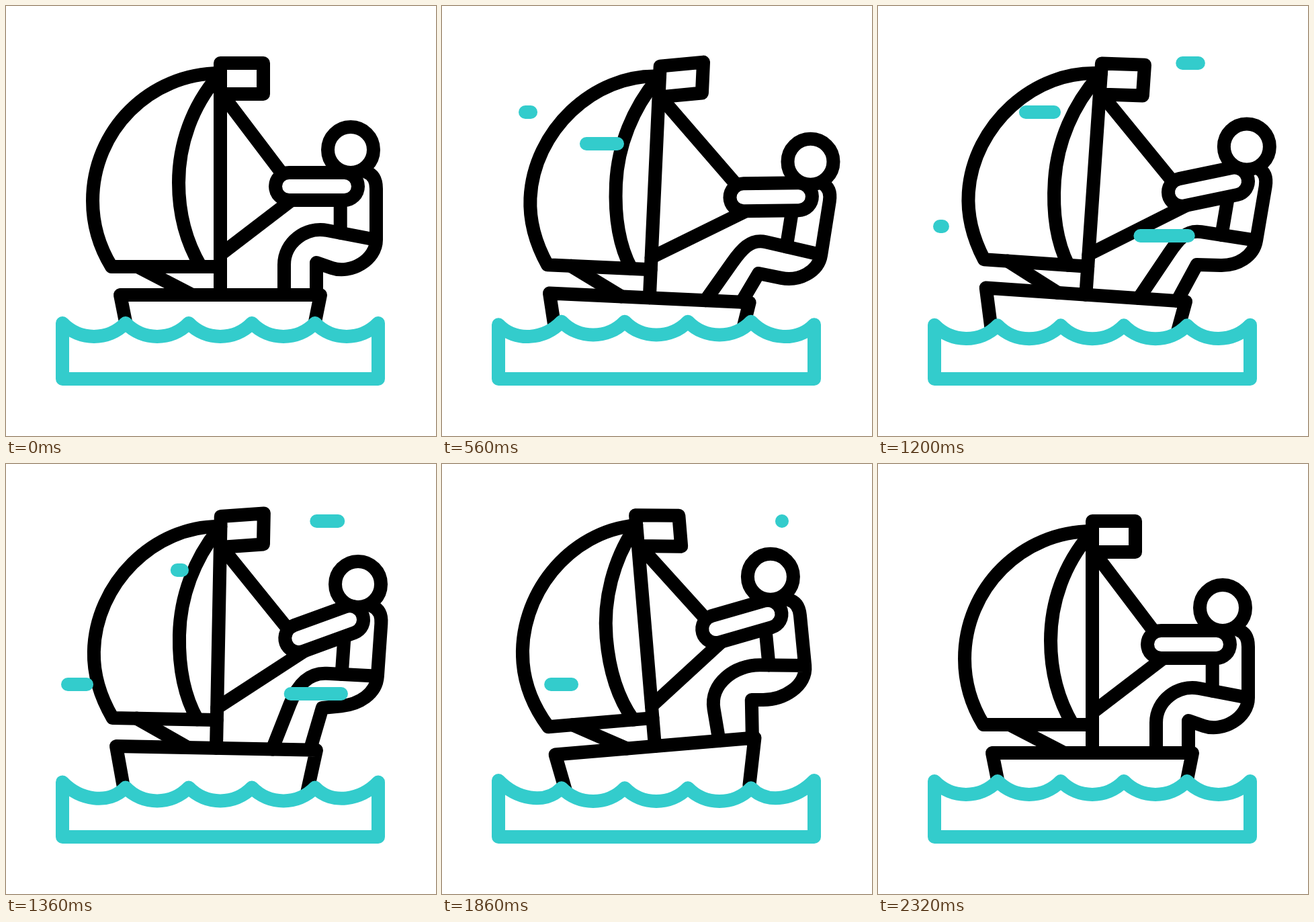
An HTML page with a canvas for the animation above (2.4 s loop, 640 by 640 pixels).

```html
<!DOCTYPE html>
<html lang="en">
<head>
<meta charset="utf-8">
<title>Sailing</title>
<style>
  html, body { margin: 0; width: 100%; height: 100%; overflow: hidden; background: #fff; }
  canvas { display: block; width: 100vw; height: 100vh; }
</style>
</head>
<body>
<canvas id="stage" width="640" height="640"></canvas>
<script>
const ctx = document.getElementById('stage').getContext('2d');
const LOOP = 2400, STEP = 20, START = 220, END = 2320;
const BLACK = '#000', CYAN = '#33cccc', WHITE = '#fff';

const ease = u => { u = Math.min(1, Math.max(0, u)); return u * u * (3 - 2 * u); };

// A value that rests at zero and eases through the given [time, value] stops.
function motion(...stops) {
  const keys = [[START, 0], ...stops, [END, 0]];
  return t => keys.slice(1).reduce((v, [end, to], i) => {
    const [begin, from] = keys[i];
    return v + (to - from) * ease((t - begin) / (end - begin));
  }, 0);
}

const leanAt = motion([840, 1], [900, 1], [1800, -.25]);
const riseAt = motion([900, 0], [1560, 1]);
const tiltAt = motion([960, 6], [1820, -4.9]);
const flagAt = motion([560, -9], [920, 4], [1400, -6], [1860, 6]);
const slackAt = t => t < START || t > END ? 0 :
  8 * Math.sin(3 * Math.PI * (t - START) / (END - START)) ** 2;

// Wind: start time, height, left end, right end.
const GUSTS = [
  [200, 205, 213, 305],
  [457, 158, 124, 262],
  [798, 342, 383, 512],
  [873, 85, 453, 506],
  [1117, 328, 92, 193]
];

const dist = (a, b) => Math.hypot(b[0] - a[0], b[1] - a[1]);
const unit = (a, b) => { const d = dist(a, b) || 1; return [(b[0] - a[0]) / d, (b[1] - a[1]) / d]; };
const go = (p, dir, n) => [p[0] + dir[0] * n, p[1] + dir[1] * n];
const mix = (a, b, f) => [a[0] + (b[0] - a[0]) * f, a[1] + (b[1] - a[1]) * f];
const turn = ([x, y], a) =>
  [x * Math.cos(a) - y * Math.sin(a), x * Math.sin(a) + y * Math.cos(a)];

function stroke(path, color = BLACK, width = 20) {
  ctx.strokeStyle = color;
  ctx.lineWidth = width;
  ctx.stroke(path);
}
function line(points, color, width) {
  const path = new Path2D();
  points.forEach(p => path.lineTo(...p));
  stroke(path, color, width);
}

function drawBoat(x, y, tilt, slack, flag) {
  ctx.save();
  ctx.translate(x, y);
  ctx.rotate(tilt);
  ctx.translate(-319, -430);
  line([[184, 500], [170, 430], [468, 430], [454, 500]]);
  line([[196 + slack / 2, 388], [277, 430]]);
  line([[319, 430], [319, 85], [383, 85 + flag], [383, 131 + flag], [319, 131]]);
  const m = slack * .75, n = slack * .55;
  stroke(new Path2D(`M319 100 C${214 + m} 100 ${129 + m} ${185 + m} ${129 + m} 290
    C${129 + m} 324.5 ${139 + slack} 358.6 ${157 + slack} 388 H319`));
  stroke(new Path2D(`M315 105 C${277.5 + n} 149 ${257 + n} 205 ${257 + n} 263
    C${257 + n} 307 267.5 350 290 388`));
  ctx.restore();
}

function drawSailor(lean, rise, onBoat) {
  // Resting place, then how far the joint goes when leaning out and when rising.
  const joint = (x, y, leanX, leanY, riseX = -11, riseY = -59) =>
    [x + lean * leanX + rise * riseX, y + lean * leanY + rise * riseY];
  const head = joint(513, 214, 62, 31, -14);
  const shoulder = joint(503.5, 268.5, 47, 26.5);
  const back = joint(551, 272, 45, 33);
  const hip = joint(551, 348, 23, 39, -8);
  const hand = joint(421.5, 268.5, 48, 28.5, -3.5, -24.5);
  const thigh = joint(478, 334, 7, 30, -4, -42);
  const shin = joint(414, 385, 31, -5, -3, -33);
  const seat = joint(485, 390, 35, 26, 2, -50);
  const knee = joint(462, 382, 16, 28, 4, -37);
  const frontFoot = onBoat(414 - 20 * lean - 6 * rise, 430);
  const rearFoot = onBoat(462 - 10 * lean, 430);
  const up = unit(hip, back), down = [-up[0], -up[1]], left = [up[1], -up[0]];

  const arm = Math.atan2(shoulder[1] - hand[1], shoulder[0] - hand[0]);
  const grip = p => { const q = turn(p, arm); return [hand[0] + q[0], hand[1] + q[1]]; };
  line([onBoat(319, 128), grip([-10.5, -19])]);
  line([onBoat(319, 370), grip([4, 20])]);

  const neck = go(go(back, up, 25), left, 15);
  const reach = dist(hip, seat) * .38;
  const bend = dist(shin, thigh) * .4;
  const path = new Path2D();
  path.moveTo(...neck);
  path.quadraticCurveTo(...go(back, up, 20), ...back);
  path.lineTo(...hip);
  path.bezierCurveTo(...go(hip, down, reach), ...go(seat, unit(knee, seat), reach), ...seat);
  path.lineTo(...knee);
  path.lineTo(...rearFoot);
  path.moveTo(...frontFoot);
  path.lineTo(...shin);
  path.bezierCurveTo(...go(shin, unit(frontFoot, shin), bend),
    ...go(thigh, unit(hip, thigh), bend), ...thigh);
  path.lineTo(...hip);
  stroke(path);

  const waist = mix(thigh, hip, .27 + .18 * lean - .05 * rise);
  line([waist, go(waist, up, 55)]);

  const face = new Path2D();
  face.arc(...head, 34, 0, Math.PI * 2);
  stroke(face);
  line([hand, shoulder], BLACK, 61);
  line([hand, shoulder], WHITE, 21);
}

function drawWater(crest, end) {
  const path = new Path2D();
  const top = i => i === 0 || i === 5 ? end : crest;
  path.moveTo(84, end);
  for (let i = 0; i < 5; i++) {
    const x = 84 + i * 94;
    path.bezierCurveTo(x + 25.5, top(i) + 26.5, x + 68.5, top(i + 1) + 26.5, x + 94, top(i + 1));
  }
  path.lineTo(554, 555);
  path.lineTo(84, 555);
  path.closePath();
  ctx.fillStyle = WHITE;
  ctx.fill(path);
  stroke(path, CYAN);
}

function drawGusts(t) {
  for (const [start, y, x0, x1] of GUSTS) {
    const age = t - start;
    if (age <= 0 || age >= 1000) continue;
    const at = u => x0 + (x1 - x0) * ease(u);
    line([[at((age - 300) / 700), y], [at(age / 700) + .01, y]], CYAN);
  }
}

function draw(t) {
  ctx.fillStyle = WHITE;
  ctx.fillRect(0, 0, 640, 640);
  ctx.lineCap = ctx.lineJoin = 'round';

  const lean = leanAt(t), rise = riseAt(t), degrees = tiltAt(t);
  const tilt = degrees * Math.PI / 180;
  const x = 319 - 27 * lean + 2 * degrees + 1.7 * rise;
  const y = 430 + 7.5 * lean - 12.5 * rise;
  const onBoat = (px, py) => {
    const p = turn([px - 319, py - 430], tilt);
    return [x + p[0], y + p[1]];
  };

  drawSailor(lean, rise, onBoat);
  drawBoat(x, y, tilt, slackAt(t), flagAt(t));
  drawWater(472 - 4 * lean + 14 * rise, 472 + 4 * lean);
  drawGusts(t);
}

const began = performance.now();
function tick() {
  const t = (performance.now() - began) % LOOP;
  draw(Math.floor(t / STEP) * STEP);
  requestAnimationFrame(tick);
}
tick();
</script>
</body>
</html>
```
